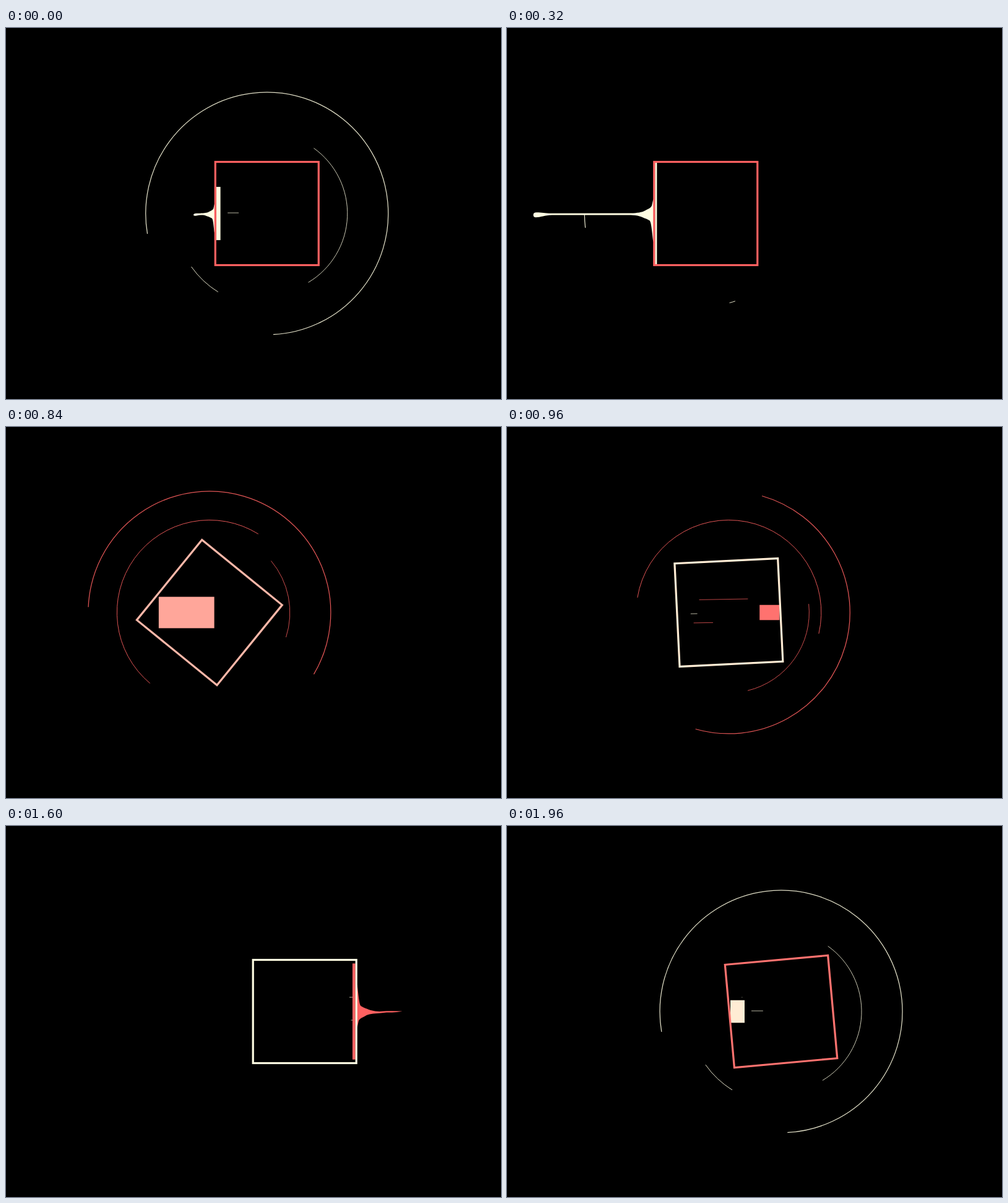
Write an HTML page that moves like this. It is 800x600 px and loops after 2000 ms.

```html
<!DOCTYPE html>
<html lang="en">
<head>
<meta charset="utf-8">
<title>Bouncing block</title>
<style>
html, body { margin: 0; width: 100%; height: 100%; overflow: hidden; background: #000; }
svg { display: block; width: 100vw; height: 100vh; }
</style>
</head>
<body>
<svg id="stage" viewBox="0 0 800 600"></svg>
<script>
const RED = [255, 97, 97], CREAM = [255, 253, 226];
const LOOP = 2000, STEP = 40;
const CX = 400.7, CY = 300, JET_Y = 301.2;
const HALF = 83.5, WALL = 85, INNER = 82, SWING = 82;
const PINCH = 360, DROP_END = 580;
const stage = document.getElementById('stage');

function set(el, attrs) {
  for (const name in attrs) el.setAttribute(name, attrs[name]);
  return el;
}
function add(tag, attrs = {}) {
  const el = document.createElementNS('http://www.w3.org/2000/svg', tag);
  stage.appendChild(el);
  return set(el, attrs);
}
const mix = (a, b, k) => `rgb(${a.map((v, i) => Math.round(v + (b[i] - v) * k))})`;

const span = (p, start, duration) => Math.max(0, Math.min(1, (p - start) / duration));
const lerp = (a, b, k) => a + (b - a) * k;
const smooth = x => x * x * (3 - 2 * x);
const outPow = (x, n) => 1 - (1 - x) ** n;

// Cubic bezier easing with horizontal handles of length k1 and k2.
function bezierEase(x, k1, k2) {
  let lo = 0, hi = 1;
  for (let i = 0; i < 24; i++) {
    const s = (lo + hi) / 2, r = 1 - s;
    const at = 3 * k1 * s * r * r + 3 * (1 - k2) * s * s * r + s ** 3;
    if (at < x) lo = s; else hi = s;
  }
  return smooth(lo);
}

// Times are relative to the impact. Ring angles are in degrees; head and tail
// are [start, duration], as are the front and back of each speed line.
const halves = [
  {
    impact: 0, dir: -1, frame: RED, fill: CREAM, lag: 0, turnEnd: 0, lineTilt: 0,
    rings: [
      { r: 196, width: 1.25, from: 154, to: 545, head: [-303, 820], tail: [-51, 414] },
      { r: 149.5, width: 1, from: 115, to: 440, head: [-14, 443], tail: [-34, 392] },
      { r: 130, width: .9, from: 270, to: 490, head: [-220, 700], tail: [-102, 400] }
    ],
    lines: [
      { y: 277, front: [-460, 525], back: [-400, 453] },
      { y: 299, front: [-360, 450], back: [-360, 515] },
      { y: 314, front: [-440, 480], back: [-400, 436] }
    ]
  },
  {
    impact: 1000, dir: 1, frame: CREAM, fill: RED, lag: 15, turnEnd: -11, lineTilt: -1,
    rings: [
      { r: 196, width: 1.25, from: 162, to: 530, head: [-361, 727], tail: [-230, 488] },
      { r: 149.5, width: 1, from: 130, to: 435, head: [-329, 700], tail: [-153, 400] },
      { r: 130, width: .9, from: 320, to: 500, head: [-245, 700], tail: [-151, 400] }
    ],
    lines: [
      { y: 278.7, front: [-300, 413], back: [-150, 393] },
      { y: 302, front: [-145, 398], back: [-118, 390], pale: true },
      { y: 316.6, front: [-180, 362], back: [-130, 391] }
    ]
  }
];

for (const half of halves) {
  const color = mix(half.fill, half.fill, 0);
  for (const ring of half.rings)
    ring.el = add('path', { fill: 'none', stroke: color, 'stroke-width': ring.width, opacity: .88 });
  for (const line of half.lines)
    line.el = add('path', { stroke: line.pale ? mix(CREAM, CREAM, 0) : color, 'stroke-width': .9, opacity: .8 });
  half.jet = add('path', { fill: color });
  half.drop = add('path', { fill: color });
}
const block = add('rect');
const frame = add('rect', { x: -HALF, y: -HALF, width: 2 * HALF, height: 2 * HALF,
  fill: 'none', 'stroke-width': 3.2 });

function arcPath(cx, r, from, to) {
  if (to - from < .1) return '';
  const point = deg => {
    const a = deg * Math.PI / 180;
    return `${cx + r * Math.cos(a)} ${CY + r * Math.sin(a)}`;
  };
  return `M${point(from)}A${r} ${r} 0 ${to - from > 180 ? 1 : 0} 1 ${point(to)}`;
}

// Splash behind the wall: a flared foot, a thin shaft and a round or pointed tip.
function jetPath(p) {
  const len = 195 * outPow(span(p, -35, 386), 2) * (1 - span(p, 320, 447));
  if (len < .5) return '';
  const f = span(p, -80, 120) * (1 - span(p, 640, 127));
  const neck = Math.min(36 * f, len * .65);
  const bulb = Math.min(30, len * .35), n = len - bulb;
  const b = lerp(.5, 1, span(p, 0, 200));
  const tip = p < PINCH
    ? `L${n} -1.2C${n + bulb * .4} -1.4 ${n + bulb * .6} ${-4.8 * b} ${len - 4} ${-5 * b}
       Q${len} ${-5 * b} ${len} -1Q${len} ${3 * b} ${len - 5} ${3 * b}
       C${n + bulb * .5} ${3 * b} ${n + bulb * .4} 1.5 ${n} 1.5`
    : `L${n} -1.9Q${len - 5} -2 ${len} -1.7Q${len - 6} .2 ${n} .4`;
  return `M-2 ${-44 * f}H0C${2 * f} ${-28 * f} ${3 * f} ${-12 * f} ${6 * f} ${-10 * f}
    S${18 * f} ${-4.5 * f} ${22 * f} ${-3.2 * f}S${neck * .9} -1.4 ${neck} -1.3
    ${tip}L${neck} 1.6C${26 * f} 2 ${18 * f} ${3 * f} ${13 * f} ${6 * f}
    S${3 * f} ${10 * f} ${2 * f} ${15 * f}L0 ${24 * f}H-2Z`;
}

function dropPath(p) {
  if (p < PINCH || p >= DROP_END) return '';
  const tip = 357 + (p - 320) * .2;
  return `M${tip - 30} -1q16 -4 26 -4q4 0 4 4q0 4 -5 4q-9 0 -25 -4Z`;
}

function drawTrails(half, p, cx) {
  const s = half.dir;
  // The step before the seam already holds the pose of the first one.
  const ringTime = half.impact === 0 && p < 0 ? p + STEP : p;
  for (const { el, r, from, to, head, tail } of half.rings)
    set(el, { d: arcPath(cx, r,
      lerp(from, to, smooth(span(ringTime, ...tail))),
      lerp(from, to, outPow(span(ringTime, ...head), 3))) });
  for (const { el, y, front, back } of half.lines) {
    const a = lerp(-78, 80, smooth(span(p, ...front)));
    const b = lerp(-78, 80, smooth(span(p, ...back)));
    set(el, {
      d: a - b > .8 ? `M${cx + s * b} ${y}H${cx + s * a}` : '',
      transform: `rotate(${half.lineTilt} ${cx + s * (a + b) / 2} ${y})`
    });
  }
  set(half.jet, { d: jetPath(p), transform: `translate(${cx + s * WALL} ${JET_Y}) scale(${s})` });
  set(half.drop, { d: dropPath(p), transform: `translate(${CX} ${JET_Y}) scale(${s})` });
}

function drawBlock(half, p, cx) {
  const q = p - half.lag;
  const rest = 2.7 + 2 * span(p, 280, 220);
  const front = lerp(4.7 - INNER, INNER, smooth(span(q, -290, 220)));
  const back = lerp(-INNER, INNER - rest, outPow(span(q, -173, 206), 2));
  const spread = Math.max(1 - span(p, -492, 377) ** 2, smooth(span(q, -75, 157)));
  const height = lerp(18, 164, spread);
  const swap = 1 - span(p, -360, 360);
  set(block, {
    x: cx + (half.dir > 0 ? back : -front), y: CY - height / 2,
    width: front - back, height, fill: mix(half.fill, half.frame, swap)
  });
  const turn = lerp(-90, 0, smooth(span(p, half.turnEnd - 274, 274)));
  set(frame, {
    transform: `translate(${cx} ${CY}) rotate(${turn})`,
    stroke: mix(half.frame, half.fill, swap)
  });
}

function draw(t) {
  const since = half => (t - half.impact + 500 + LOOP) % LOOP - 500;
  const active = halves.find(half => since(half) < 500);
  const p = since(active);
  const cx = CX + active.dir * lerp(-SWING, SWING, bezierEase(span(p, -356, 790), .7, .73));
  for (const half of halves) drawTrails(half, since(half), cx);
  drawBlock(active, p, cx);
}

const start = performance.now();
function tick() {
  const t = (performance.now() - start) % LOOP;
  draw(Math.floor(t / STEP) * STEP);
  requestAnimationFrame(tick);
}
tick();
</script>
</body>
</html>
```
